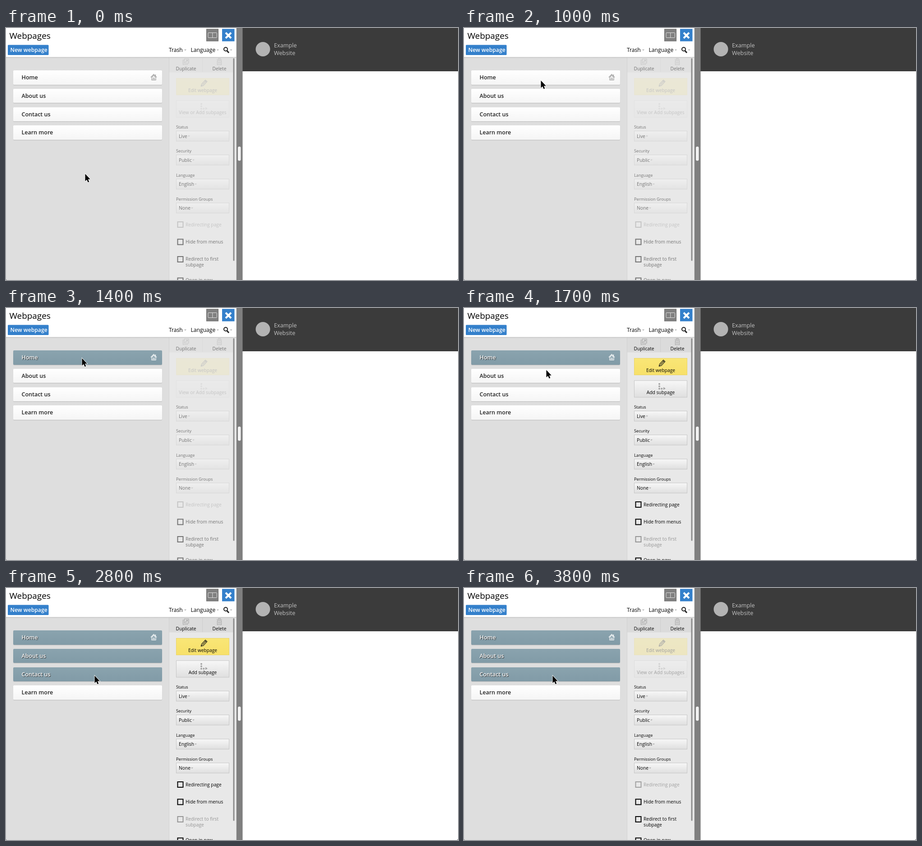
An HTML page for the animation above (3900 ms loop, 1002 by 559 pixels).

```html
<!DOCTYPE html>
<html lang="en">
<head>
<meta charset="utf-8">
<title>Webpages</title>
<style>
html, body { margin: 0; width: 100%; height: 100%; overflow: hidden; background: #444; }
#stage {
  position: relative; width: 1002px; height: 559px; overflow: hidden;
  background: #fff; border-radius: 0 0 3px 3px;
  font-family: "Open Sans", sans-serif;
}
#stage > svg { position: absolute; left: 0; top: 0; }
.mid { text-anchor: middle; }
.menu { font-size: 12.15px; }
.panel { font-size: 10.25px; }
.label { font-size: 9.2px; }
.box { fill: none; stroke: #000; stroke-width: 2; }

.row {
  position: absolute; left: 15.5px; width: 330px; height: 31.5px; box-sizing: border-box;
  padding-left: 19px; border-radius: 2px;
  font: 600 12.5px/31px "Open Sans", sans-serif; color: #222;
  background: linear-gradient(#fff, #f5f5f5);
  box-shadow: 0 1px 1px rgba(0, 0, 0, .17);
}
.row svg { position: absolute; left: 304.5px; top: 7px; color: #999; }

/* Every state change is a hard cut */
.row, .row svg, .panel, .single, #cursor { animation: 3900ms step-end infinite; }
.first { animation-name: pick-first; }
.first svg { animation-name: icon; }
.more { animation-name: pick-more; }
.panel { animation-name: wake; }
.single { --off: .31; --on: 1; animation-name: single; }
.plural { --off: 1; --on: .36; }
.hide { --off: 1; --on: 0; }
.show { --off: 0; --on: 1; }
#cursor { animation-name: move; }

@keyframes pick-first {
  33.33%, 100% { color: #fff; background: linear-gradient(#8aa3ae, #819ba7); text-shadow: 1px 1px 1px #222; }
}
@keyframes pick-more {
  71.79%, 100% { color: #fff; background: linear-gradient(#8aa3ae, #819ba7); text-shadow: 1px 1px 1px #222; }
}
@keyframes icon { 33.33%, 100% { color: #fff; } }
@keyframes wake {
  0% { opacity: .5; }
  41.02%, 100% { opacity: 1; }
}
@keyframes single {
  0% { opacity: var(--off); }
  41.02% { opacity: var(--on); }
  79.48%, 100% { opacity: var(--off); }
}
/* Held for 100 ms per step: up to the first row, then down to the third */
@keyframes move {
  0% { transform: translate(176px, 324px); }
  10.25% { transform: translate(176px, 319px); }
  12.82% { transform: translate(175px, 294px); }
  15.38% { transform: translate(174px, 248px); }
  17.94% { transform: translate(173px, 193px); }
  20.51% { transform: translate(172px, 147px); }
  23.07% { transform: translate(171px, 122px); }
  25.64% { transform: translate(171px, 117px); }
  28.2% { transform: translate(170px, 114px); }
  30.76% { transform: translate(169px, 112px); }
  41.02% { transform: translate(173px, 119px); }
  43.58% { transform: translate(183px, 138px); }
  46.15% { transform: translate(190px, 160px); }
  48.71% { transform: translate(194px, 178px); }
  51.28% { transform: translate(196px, 189px); }
  53.84% { transform: translate(197px, 194px); }
  56.41%, 100% { transform: translate(197px, 195px); }
}
</style>
</head>
<body>
<div id="stage">
  <svg width="1002" height="559" viewBox="0 0 1002 559">
    <defs>
      <linearGradient id="silver" x2="0" y2="1">
        <stop stop-color="#f7f7f7"/><stop offset="1" stop-color="#dfdfdf"/>
      </linearGradient>
      <linearGradient id="gold" x2="0" y2="1">
        <stop stop-color="#f9e676"/><stop offset="1" stop-color="#f7e069"/>
      </linearGradient>
      <linearGradient id="shade" x2="0" y2="1">
        <stop stop-color="#bbb"/><stop offset="1" stop-color="#bbb" stop-opacity="0"/>
      </linearGradient>
      <path id="caret" d="M0 0h5l-2.5 3z" fill="#b5b5b5"/>
      <rect id="select" x="377.5" y=".5" width="117" height="22.5" fill="url(#silver)" stroke="#c6c6c6"/>
    </defs>

    <!-- Site preview -->
    <path d="M524 0h478v96H524z" fill="#3b3b3b"/>
    <circle cx="569.5" cy="47" r="16" fill="#b3b3b3"/>
    <g fill="#c2c2c2" font-size="12.7">
      <text x="594" y="43">Example</text>
      <text x="594" y="60">Website</text>
    </g>

    <!-- Divider -->
    <path d="M510.5 0H524.5V559H510.5z" fill="#7f7f7f"/>
    <rect x="514" y="263" width="6.5" height="31.5" rx="3" fill="#f1f1f1"/>

    <!-- Body -->
    <path d="M0 65h362v494H0z" fill="#dedede"/>
    <path d="M361.5 65H510.5V559H361.5z" fill="#e8e8e8"/>
    <path d="M361.5 65V559" stroke="#d2d2d2"/>

    <g class="panel">
      <path d="M362 65H504V98.5H362z" fill="#dbdbdb"/>
      <path d="M435.5 66V98" stroke="#cecece"/>
      <g fill="none" stroke="#a8a8a8" stroke-width="1.2">
        <path d="M395.5 68.5h9.5v9.5h-9.5zM394 71h-1.5v10h10v-1.5M397.5 76l5-5M399 71h3.5v3.5"/>
        <path d="M467 70h12M471 69.5v-2h4v2M468.5 72.5h9v9h-9zM471.5 74.5v5M474.5 74.5v5"/>
      </g>
      <g class="mid">
        <text x="399" y="94">Duplicate</text>
        <text x="473" y="94">Delete</text>
      </g>

      <g class="single mid">
        <rect x="377.5" y="111.5" width="117" height="37" fill="url(#gold)" stroke="#ead468"/>
        <g fill="none" stroke="#3d3a25" stroke-width="1.4" stroke-linejoin="round">
          <path d="M432.5 129l1.2-4.8 8.3-9 3.8 3.5-8.3 9zM435.5 126l8-8.7M440.5 116.8l3.8 3.5"/>
          <path d="M432.5 129l.6-2.4 1.7 1.5z" fill="#3d3a25"/>
        </g>
        <text x="436" y="142">Edit webpage</text>
      </g>

      <g class="single mid">
        <rect x="377.5" y="161" width="117" height="37" fill="url(#silver)" stroke="#c6c6c6"/>
        <g fill="#a3a3a3">
          <circle cx="433" cy="168.5" r="2"/>
          <circle cx="433" cy="173.8" r="2"/>
          <circle cx="433" cy="179" r="2"/>
          <circle cx="438.3" cy="179" r="2"/>
          <path d="M442 175.5l5 3-5 3z"/>
        </g>
        <text class="single hide" x="436" y="191">View or Add subpages</text>
        <text class="single show" x="436" y="191">Add subpage</text>
      </g>

      <g class="label">
        <text x="377" y="223">Status</text>
        <text x="377" y="276">Security</text>
        <text x="377" y="329.5">Language</text>
        <text x="377" y="382.5">Permission Groups</text>
      </g>
      <use href="#select" y="228"/>
      <use href="#select" y="281"/>
      <use href="#select" y="334.5"/>
      <use href="#select" y="387.5"/>
      <text x="383" y="243.5">Live</text>
      <text x="383" y="297">Public</text>
      <text x="383" y="350">English</text>
      <text x="383" y="403">None</text>
      <use href="#caret" x="403" y="238.5"/>
      <use href="#caret" x="413" y="291.5"/>
      <use href="#caret" x="418" y="345"/>
      <use href="#caret" x="410" y="398"/>

      <g class="single">
        <rect class="box" x="380.5" y="430" width="12" height="12"/>
        <text x="398" y="439.5">Redirecting page</text>
      </g>
      <rect class="box" x="380.5" y="468.5" width="12" height="12"/>
      <text x="398" y="478">Hide from menus</text>
      <g class="single plural">
        <rect class="box" x="380.5" y="507" width="12" height="12"/>
        <text x="398" y="516">Redirect to first</text>
        <text x="398" y="528.5">subpage</text>
      </g>
      <rect class="box" x="380.5" y="554.5" width="12" height="12"/>
      <text x="398" y="563">Open in new</text>
    </g>
    <rect x="503.5" y="67" width="3" height="449.5" rx="1.5" fill="#8d8d8d"/>

    <!-- Toolbar -->
    <path d="M0 0H510.5V64.5H0z" fill="#fff"/>
    <path d="M0 64.5H510.5V67H0z" fill="url(#shade)"/>
    <text x="7.5" y="23.5" font-size="18.9">Webpages</text>
    <rect x="4" y="37.5" width="90.5" height="22.5" rx="1.5" fill="#3480cb"/>
    <text x="9.5" y="52.5" class="menu" font-weight="600" fill="#fff">New webpage</text>
    <text x="361" y="52.5" class="menu">Trash</text>
    <text x="409.5" y="52.5" class="menu">Language</text>
    <use href="#caret" x="395" y="47.5"/>
    <use href="#caret" x="467" y="47.5"/>
    <use href="#caret" x="496.5" y="47.5"/>
    <circle cx="487" cy="47" r="4" fill="none" stroke="#222" stroke-width="2"/>
    <path d="M490 50.5l4 4.5" stroke="#222" stroke-width="3"/>
    <rect x="444.5" y="2.5" width="26" height="26.5" fill="#808080" stroke="#6b6b6b"/>
    <path d="M449 10.500h17.500q1 0 1 1v9q0 1-1 1H449q-1 0-1-1v-9q0-1 1-1zM457.800 10.500v11" fill="none" stroke="#e2e2e2"/>
    <rect x="479" y="2" width="27.5" height="27.5" fill="#3480cb"/>
    <path d="M487 10.5l12 12M499 10.5l-12 12" stroke="#fff" stroke-width="4.200"/>
  </svg>

  <div class="row first" style="top:94px">Home
    <svg width="16" height="16" viewBox="0 0 16 16" fill="none" stroke="currentColor" stroke-width="1.200">
      <path d="M.8 8.300L7.500 1.500l6.700 6.800M3 8.500v6h9v-6M3 8.500L7.500 4 12 8.500M11.500 5V2M6 14v-4h3v4"/>
    </svg>
  </div>
  <div class="row more" style="top:134.7px">About us</div>
  <div class="row more" style="top:175.5px">Contact us</div>
  <div class="row" style="top:216.2px">Learn more</div>

  <svg width="1002" height="559" viewBox="0 0 1002 559">
    <g id="cursor">
      <path d="M-.5-.5V15.700L3.200 12.400 5.700 18.300 8.300 17.200 5.900 11.400H10.800Z" stroke="#fff" stroke-width="1.600" paint-order="stroke"/>
    </g>
  </svg>
</div>
</body>
</html>
```
